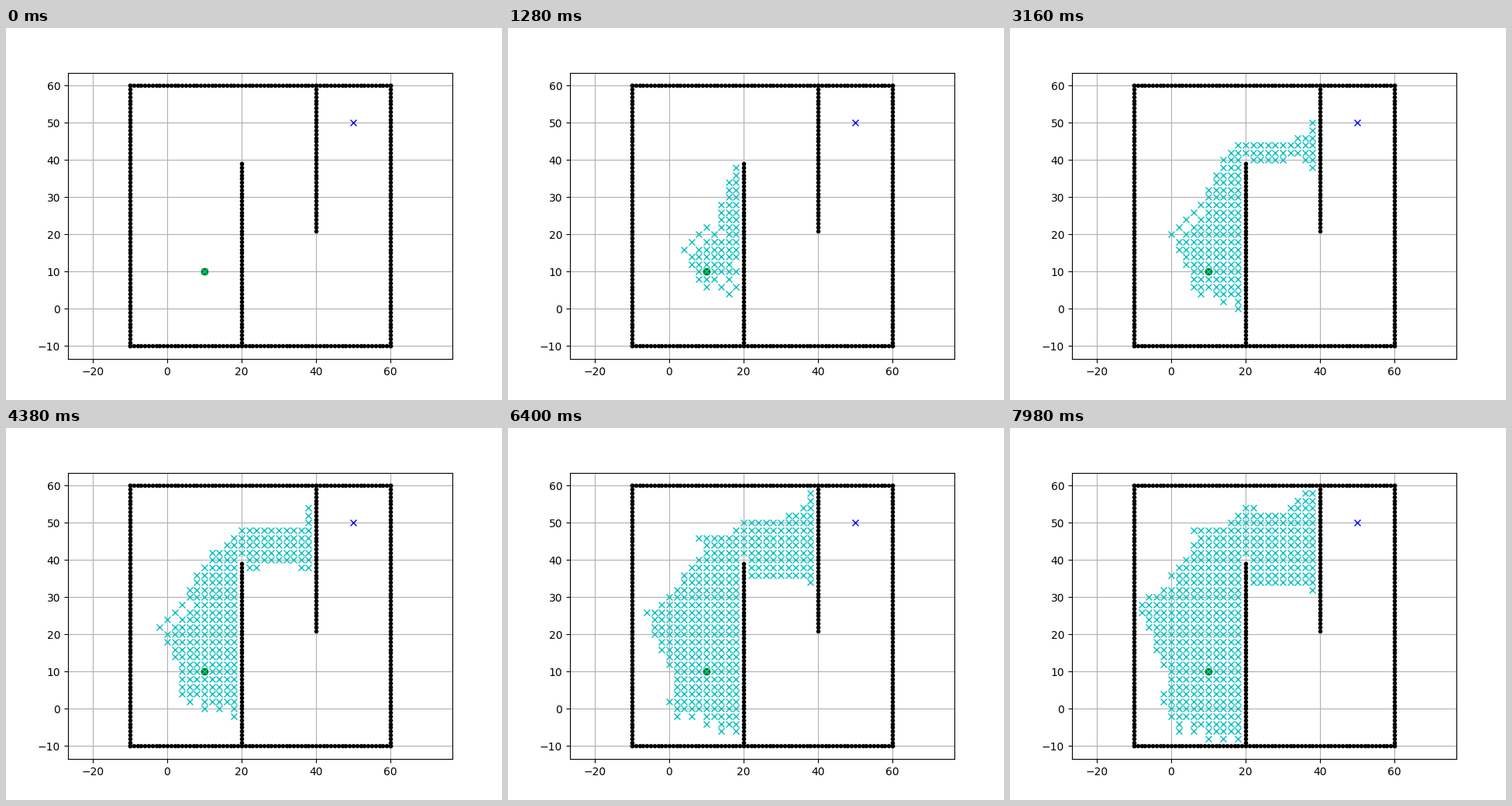
These frames come from a looping animation (640x480 px, 8000 ms). A matplotlib script:

```python
import math

import matplotlib.pyplot as plt
from matplotlib.animation import FuncAnimation

FRAMES = 400
INTERVAL = 20
CELL = 2.0
RADIUS = 1.0
START = (10, 10)
GOAL = (50, 50)
LOW, HIGH = -10, 60

DIAG = math.sqrt(2)
MOVES = [(1, 0, 1), (0, 1, 1), (-1, 0, 1), (0, -1, 1),
         (-1, -1, DIAG), (-1, 1, DIAG), (1, -1, DIAG), (1, 1, DIAG)]


def build_walls():
    span = range(LOW, HIGH + 1)
    walls = [(i, LOW) for i in span] + [(i, HIGH) for i in span]
    walls += [(LOW, i) for i in span] + [(HIGH, i) for i in span]
    walls += [(20, i) for i in range(LOW, 40)]
    walls += [(40, HIGH - i) for i in range(40)]
    return walls


def free_cells(walls):
    lo, hi = round(LOW / CELL), round(HIGH / CELL)
    reach = RADIUS / CELL
    scaled = [(x / CELL, y / CELL) for x, y in walls]
    return {(x, y)
            for x in range(lo, hi) for y in range(lo, hi)
            if all(math.hypot(wx - x, wy - y) > reach for wx, wy in scaled)}


def search(free, count):
    """Best-first search; an open cell always takes its latest cost."""
    start = tuple(round(v / CELL) for v in START)
    gx, gy = (round(v / CELL) for v in GOAL)

    def score(cell):
        x, y = cell
        return cost[cell] + math.sqrt((gx - x) ** 2 + (gy - y) ** 2)

    cost = {start: 0.0}
    closed, order = set(), []
    while cost and len(order) < count:
        cell = min(cost, key=score)
        g = cost.pop(cell)
        closed.add(cell)
        order.append(cell)
        for dx, dy, step in MOVES:
            nxt = (cell[0] + dx, cell[1] + dy)
            if nxt in free and nxt not in closed:
                cost[nxt] = g + step
    return order


walls = build_walls()
visited = search(free_cells(walls), FRAMES)
xs = [x * CELL for x, _ in visited]
ys = [y * CELL for _, y in visited]

plt.rcParams["font.family"] = "DejaVu Sans"
fig, ax = plt.subplots(figsize=(6.4, 4.8), dpi=100)
ax.plot(*zip(*walls), ".k")
ax.plot(*START, "og")
ax.plot(*GOAL, "xb")
ax.grid(True)
ax.axis("equal")
crosses, = ax.plot(xs[:1], ys[:1], "xc")


def update(frame):
    crosses.set_data(xs[:frame + 1], ys[:frame + 1])
    return crosses,


anim = FuncAnimation(fig, update, frames=FRAMES, interval=INTERVAL,
                     init_func=lambda: update(0), repeat=True)
plt.show()
```
